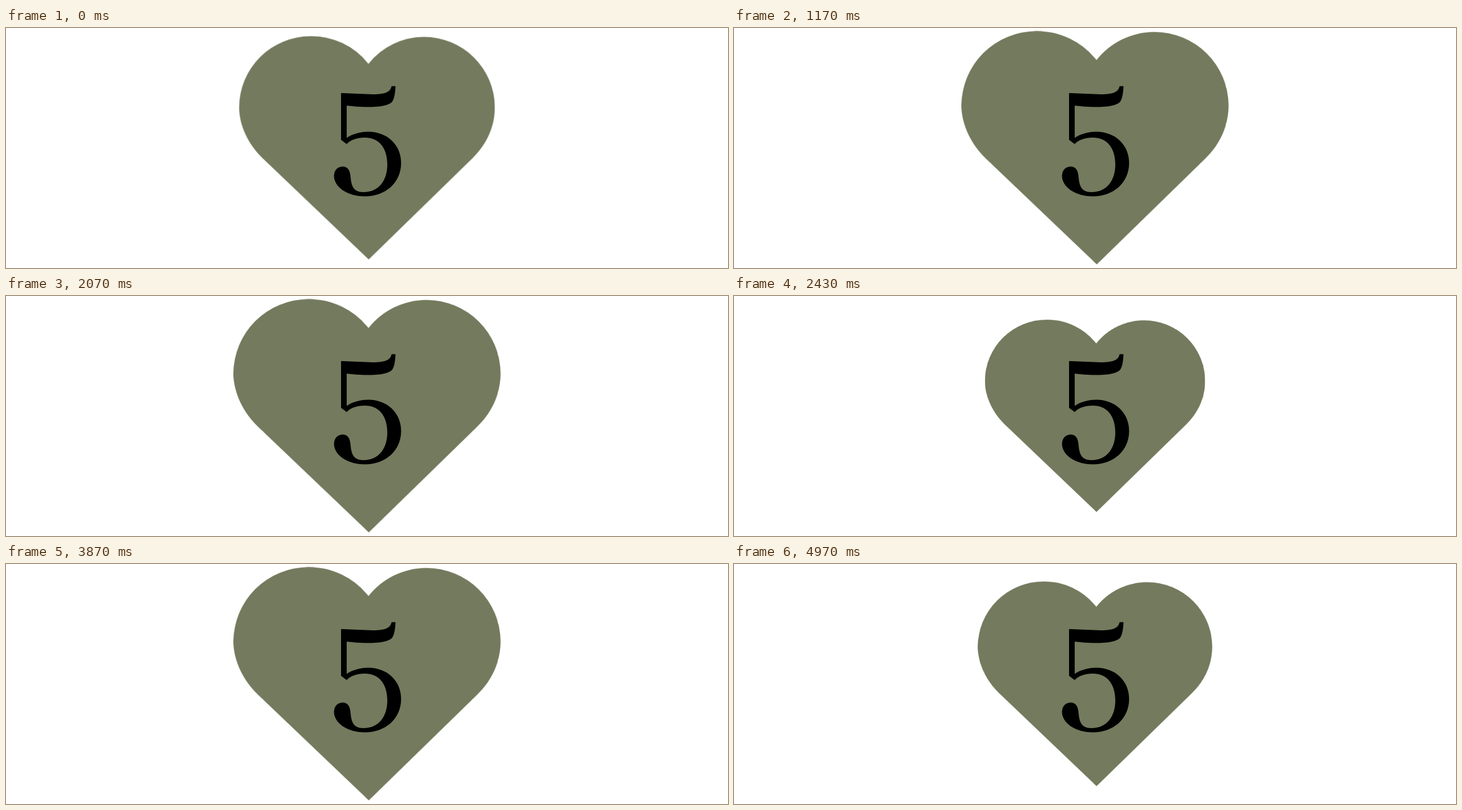
Write an HTML page that moves like this. It is 1280 px wide and 427 px high and loops after 5.01 s.

```html
<!DOCTYPE html>
<html lang="en">
<head>
<meta charset="utf-8">
<title>Beating heart</title>
<style>
  html, body { margin: 0; width: 100%; height: 100%; overflow: hidden; background: #fff; }
  svg { display: block; width: 100%; height: 100%; }
  #heart { fill: #747a5d; transform-box: view-box; transform-origin: 640px 213.5px; }
</style>
</head>
<body>
<svg viewBox="0 0 1280 427" role="img" aria-label="5">
  <path id="heart" d="M643 412 L455 232 C430 208 413 174.5 413 141
    A127 127 0 0 1 540 14.3 A128 128 0 0 1 642.5 63.5
    A126 126 0 0 1 741 15.5 A126 126 0 0 1 867 141
    C867 175.5 852.5 207 828 231 Z"/>
  <path id="five" d="M594 115.7 L650 118 C674 118 682 113 683.5 103.5 H690.5
    C690 118 688 127 684 132 C678 138 663 140.5 641 140.5
    C627 140.5 612 139 604 138 V195.5 C614 188.5 628 184.5 642 184.5
    C676 184.5 700.5 208 700.5 240 C700.5 275 673 299.5 636 299.5
    C604 299.5 581.5 282 581.5 263 C581.5 253 588 246.5 597 246.5
    C606 246.5 610 253 611 266 C612.5 284 618 292 634 292
    C660 292 676 272 676 243 C676 213 661 195 636 195
    C622 195 611 199 604 206.5 L594 199 Z"/>
</svg>
<script>
const DURATION = 5010, STEPS = 150;
const RISE = 9, FALL = 18, PEAK = 4.5;           // in steps of 1/30 s
const DRAWN_WIDTH = 454, SMALL = 385.3, LARGE = 521.3;

// Each beat swells evenly, then relaxes with a quadratic ease-out.
function heartWidth(step) {
  const beat = RISE + FALL;
  const phase = (step - PEAK + beat) % beat;
  const swell = phase < FALL ? (1 - phase / FALL) ** 2 : (phase - FALL) / RISE;
  return SMALL + (LARGE - SMALL) * swell;
}

const startTime = step => Math.round(step * 10 / 3) * 10;

const keyframes = Array.from({ length: STEPS }, (_, step) => ({
  offset: startTime(step) / DURATION,
  transform: `scale(${heartWidth(step) / DRAWN_WIDTH})`,
  easing: "steps(1, end)"
}));
keyframes.push({ ...keyframes[STEPS - 1], offset: 1 });

document.getElementById("heart").animate(keyframes, { duration: DURATION, iterations: Infinity });
</script>
</body>
</html>
```
